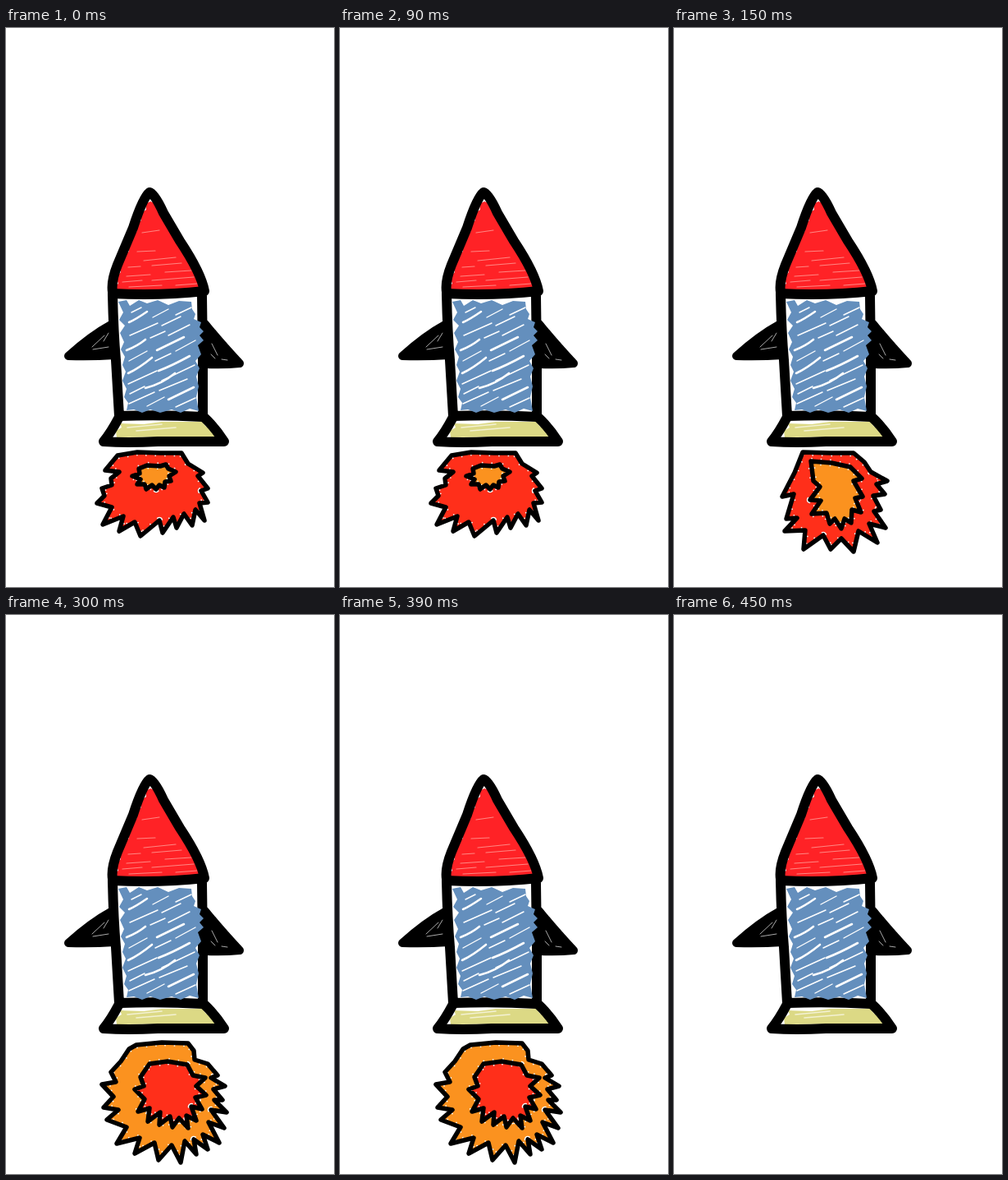
Recreate the animation shown at these times as an HTML page. Size 400 px wide and 680 px high, loop 0.6 s.

```html
<!DOCTYPE html>
<html lang="en">
<head>
<meta charset="utf-8">
<title>Rocket</title>
<style>
  html, body { margin: 0; width: 100%; height: 100%; overflow: hidden; background: #fff; }
  svg { display: block; width: 100%; height: 100%; }
  path { fill: none; stroke-linecap: round; stroke-linejoin: round; }
  .ink { stroke: #000; stroke-width: 12; }
  .fin { fill: #000; stroke: #000; stroke-width: 10; }
  .glint { stroke: #aaa; stroke-width: 1; }
  .specks { stroke: #fff; stroke-width: 8.5; stroke-dasharray: 1.5 10; stroke-linecap: butt; }
  .edge { stroke: #000; stroke-width: 5.5; }
</style>
</head>
<body>
<svg viewBox="0 0 400 680">
  <g id="flames"></g>

  <!-- fins -->
  <path class="fin" d="M128 361Q104 374 76 399Q104 400 132 398ZM243 360Q259 380 285 408Q266 410 244 409Z"/>
  <path class="glint" d="M105 388L120 374M106 391L125 388M119 381L125 371M251 384L258 398M250 397L255 402M263 403L270 404"/>

  <!-- nose -->
  <path style="fill:#ff2226" d="M176 211Q182 212 184 219L188 221L187 228L197 232L197 239L204 243L204 250L212 255L213 263L220 266L219 273L229 280L228 287L236 294L235 303L240 312L240 320L132 321L131 315L137 311L134 303L140 297L137 289L144 284L142 276L150 272L147 263L155 258L153 251L160 247L159 239L165 234L165 225L171 221L170 214Z"/>
  <path stroke="#ff8682" stroke-width="1.2" d="M166 249L187 246M160 272L182 271M168 283L207 279M149 291L164 290M178 289L214 286M147 302L176 300M194 297L226 295M142 309L166 307M178 307L229 303M150 315L190 313M207 313L233 311"/>

  <!-- nozzle -->
  <path style="fill:#dcd985" d="M139 481L168 482L190 479L239 479L244 485L253 489L255 497L135 498L134 490L141 486Z"/>
  <path stroke="#f3f1d3" stroke-width="1.6" d="M148 486L190 482M159 490L207 486"/>

  <!-- outline -->
  <path class="ink" d="M130 321Q128 308 136 288L155 243Q167 206 175 200Q181 201 192 225L212 259Q238 298 242 320Q188 326 130 323"/>
  <path class="ink" d="M130 324Q131 370 134 404L138 472Q190 470 240 473L240 403L239 326"/>
  <path class="ink" d="M137 475Q128 492 119 503Q148 505 185 503L266 503Q254 485 242 474"/>

  <!-- body, scribbled slightly over its right edge -->
  <path style="fill:#648fbd" d="M137 333L147 331L151 338L162 331L172 335L185 331L198 337L211 332L226 333L227 342L231 348L229 354L238 358L236 364L241 369L236 374L241 380L234 386L238 397L231 405L236 414L232 424L235 436L232 449L235 466L224 463L213 468L202 464L188 468L176 464L166 468L156 464L147 465L149 456L144 449L147 439L142 429L146 418L142 410L145 400L140 391L144 382L139 371L145 362L138 355L143 346Z"/>
  <g stroke="#fff">
    <path stroke-width="2.6" d="M150 358Q159 354 172 345M147 392Q160 387 170 379M184 392L217 376M149 420Q162 414 178 401M186 417Q202 411 224 399M170 438Q190 433 206 420M198 452L229 437"/>
    <path stroke-width="1.4" d="M153 346L165 340M179 352L198 342M207 349L226 340M151 374L185 359M190 362L213 351M198 374L224 361M176 377L194 369M150 405L172 393M207 393L231 380M182 405L201 396M149 433L184 417M190 429L230 410M151 445L169 436M187 441L221 427M150 457L181 443M172 460L193 449M207 461L231 450"/>
  </g>
</svg>
<script>
const RED = '#ff2f1a', ORANGE = '#fb921f';

// Each flame: outer colour and outline, then core colour and outline.
const flames = [
  [RED, 'M136 520L160 516L188 517L214 517L222 530L240 541L234 545L246 560L238 563L246 577L236 578L242 599L231 586L227 605L217 591L208 608L204 595L191 614L187 599L164 618L157 601L138 612L143 594L118 604L129 583L111 578L120 569L117 560L129 556L128 548L138 540L121 538Z',
   ORANGE, 'M162 536L172 532L188 533L195 531L198 536L207 540L199 545L201 551L194 552L193 559L187 556L183 561L178 556L171 561L169 555L160 555L164 549L154 545L163 542Z'],
  [RED, 'M157 516L190 517L219 517L232 528L240 540L260 551L247 555L257 567L243 569L252 586L244 588L258 608L238 603L248 626L225 612L219 637L204 621L191 634L182 617L158 634L160 611L135 612L150 596L137 597L146 567L132 570L147 541Z',
   ORANGE, 'M167 527L192 529L215 534L229 548L219 551L230 570L221 572L228 589L217 586L216 602L208 597L204 609L196 597L190 603L186 590L168 591L179 575L166 574L178 558L170 551Z'],
  [ORANGE, 'M159 523L190 520L222 521L229 530L230 541L246 546L258 560L250 563L267 573L253 577L264 590L254 590L269 605L250 602L266 624L247 617L260 642L240 632L246 650L229 638L232 656L218 640L213 666L202 645L186 663L181 642L157 655L163 636L135 643L147 623L123 614L137 602L119 599L131 586L117 571L134 568L128 556L140 543L150 528Z',
   RED, 'M175 546L197 543L221 547L228 560L243 563L232 573L244 584L231 587L239 601L226 598L232 615L220 609L222 624L211 612L203 623L200 610L187 620L188 605L173 616L175 600L161 604L169 589L157 577L168 573L164 562Z'],
];

const line = (cls, d, fill = 'none') => `<path class="${cls}" style="fill:${fill}" d="${d}"/>`;
const shape = (fill, d) => line('specks', d, fill) + line('edge', d);

const group = document.getElementById('flames');
group.innerHTML = flames.map(([outer, rim, inner, core]) =>
  `<g>${shape(outer, rim)}${shape(inner, core)}</g>`).join('');

// Three flames in turn, then a beat with none.
function draw() {
  const step = Math.floor(performance.now() / 150) % 4;
  [...group.children].forEach((g, i) => g.setAttribute('visibility', i === step ? 'visible' : 'hidden'));
  requestAnimationFrame(draw);
}
draw();
</script>
</body>
</html>
```
